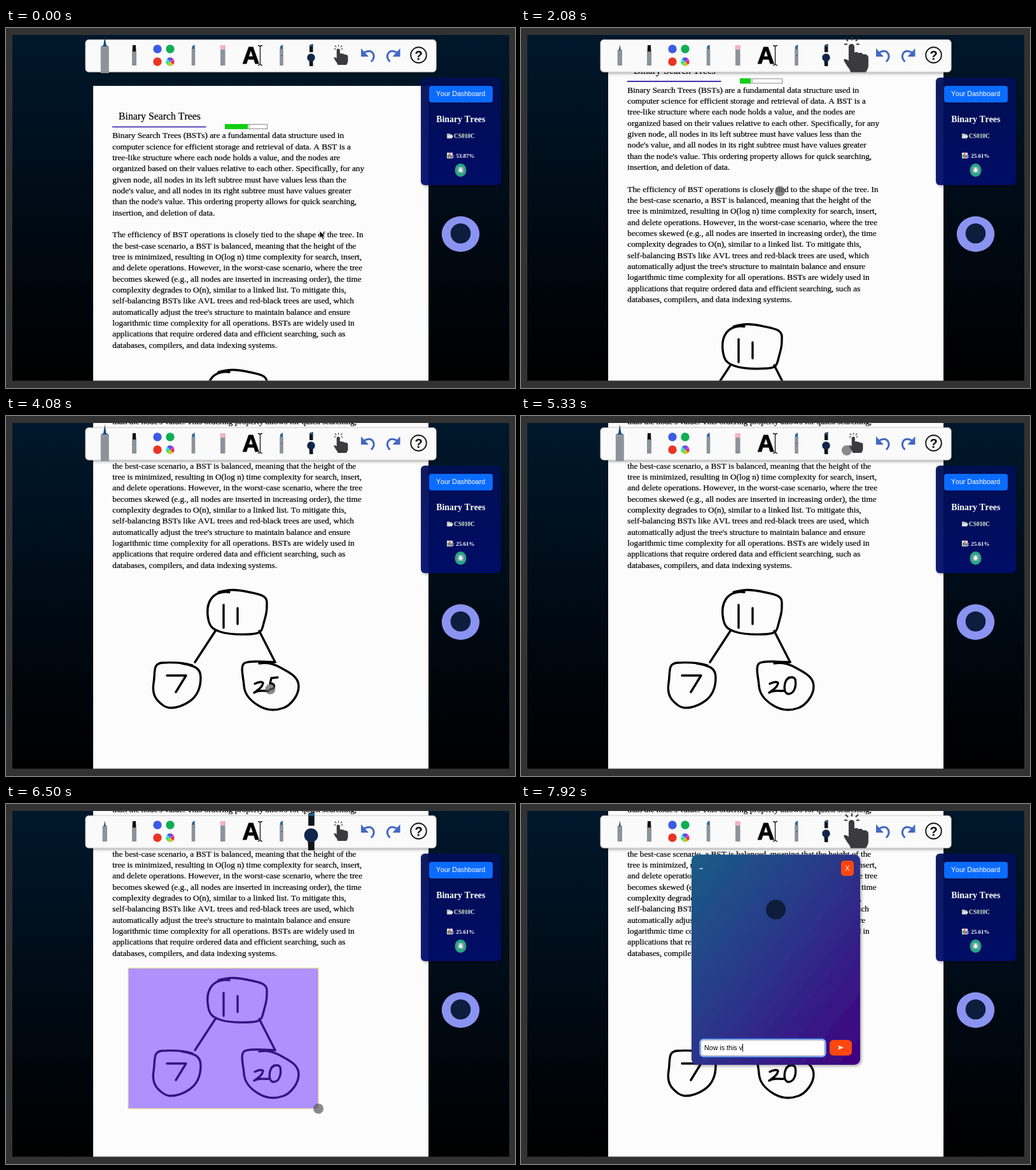
These frames come from a looping animation (800x566 px, 8000 ms). An HTML page:

```html
<!DOCTYPE html>
<html lang="en">
<head>
<meta charset="utf-8">
<title>Study board</title>
<style>
html, body { margin: 0; width: 100%; height: 100%; overflow: hidden; background: #323232; }
svg { display: block; width: 100vw; height: 100vh; }
text { font-family: "Liberation Serif", Times, serif; white-space: pre; font-kerning: none; }
.sans { font-family: "Liberation Sans", Arial, sans-serif; }
.bold { font-weight: bold; }
.ink { fill: none; stroke: #000; stroke-width: 3.4; stroke-linecap: round; stroke-linejoin: round; }
#article { font-size: 13.24px; stroke: #000; stroke-width: .22; }
</style>
</head>
<body>
<svg viewBox="0 0 800 566">
  <defs>
    <linearGradient id="night" x2="0" y2="1">
      <stop stop-color="#00182b"/><stop offset=".5" stop-color="#000b16"/><stop offset="1" stop-color="#000"/>
    </linearGradient>
    <linearGradient id="chatFill" x2="1" y2="1">
      <stop stop-color="#195d86"/><stop offset=".5" stop-color="#2c338a"/><stop offset="1" stop-color="#400080"/>
    </linearGradient>
    <linearGradient id="panelFill" x2="0" y2="1">
      <stop stop-color="#000a56"/><stop offset="1" stop-color="#000a6c"/>
    </linearGradient>
    <filter id="shadow" x="-20%" y="-20%" width="140%" height="150%">
      <feDropShadow dy="2" stdDeviation="2" flood-opacity=".35"/>
    </filter>
    <clipPath id="screen"><rect x="10" y="11" width="781" height="543.5"/></clipPath>
  </defs>

  <rect width="800" height="566" fill="#323232"/>
  <rect x="10" y="11" width="781" height="543.5" fill="url(#night)"/>

  <g clip-path="url(#screen)">
    <g id="page">
      <rect x="137" y="91" width="527" height="900" fill="#fcfcfc"/>
      <text x="177" y="143.5" font-size="15.8" stroke="#000" stroke-width=".2">Binary Search Trees</text>
      <path d="M167 155.5H314.5" stroke="#2c0fa2" stroke-width="1.7"/>
      <rect x="344.5" y="151.5" width="66" height="7" fill="#fff" stroke="#8a8a8a"/>
      <rect id="barFill" x="344" y="151" height="8" fill="#12cf12"/>
      <rect id="barEnd" y="152" width="4" height="6" fill="#d2dcd2"/>
      <g id="article"></g>
      <g class="ink" transform="translate(0 264)">
        <path d="M351 277C340 275 328 279 322 288S316 310 318 320S324 335 336 339S366 344 385 343S402 336 406 322S410 305 410 293S396 280 378 276S350 273 334 277"/>
        <path d="M342 297V333M364 302V327M329 338L297 387M398 338L423 387"/>
        <path d="M293 392C280 388 262 387 246 388S235 402 232 420S236 447 247 455S276 457 288 449S306 428 306 411S292 392 276 389"/>
        <path d="M253 408H283L267 434"/>
        <path d="M423 387C400 386 385 385 376 388S373 410 374 424S384 448 398 456S425 463 436 459S460 440 460 425S446 404 434 397S412 387 398 389"/>
        <path d="M391 421C397 418 404 417 404 420C403 426 397 430 390 435C397 430 404 433 413 432"/>
        <path id="five" pathLength="1" d="M427 411L417 412L415 421C424 418 424 433 413 429"/>
        <path id="zero" pathLength="1" d="M421 411C412 418 412 436 420 437C430 437 433 424 431 414C428 409 422 410 417 415"/>
      </g>
    </g>
    <rect id="selection" fill="#6328ff" fill-opacity=".5" stroke="#f4dc90" stroke-width="1.2"/>
  </g>

  <rect x="125" y="18.5" width="551" height="50.5" rx="5" fill="#fafafa" stroke="#d4d4d4" filter="url(#shadow)"/>
  <g id="pen">
    <path d="M-1.3 -9L0 -17L1.3 -9L3.4 -8H-3.4Z" fill="#174a7c"/>
    <path d="M-3.7 -8H3.7V16H-3.7Z" fill="#8d939b"/>
  </g>
  <g transform="translate(201.5 43)">
    <path d="M-2.5 -16H2.5L3 -5H-3Z" fill="#111"/><path d="M-3.5 -6H3.5V16H-3.5Z" fill="#8d939b"/>
  </g>
  <circle cx="238" cy="33" r="6.7" fill="#3b5be6"/>
  <circle cx="258" cy="33" r="6.7" fill="#0fae55"/>
  <circle cx="238" cy="53" r="6.7" fill="#ea3424"/>
  <g id="wheel" transform="translate(258 53)"></g>
  <g id="marker" transform="translate(294.5 43)">
    <path d="M-2.2 -10V-14L2.2 -17V-10Z" fill="#2d6596"/><path d="M-2.8 -10H2.8V16H-2.8Z" fill="#8d939b"/>
  </g>
  <use href="#marker" x="138.5"/>
  <path d="M432 43h3" stroke="#555"/>
  <path d="M337 34H344.5V59H337Z" fill="#8d939b"/>
  <path d="M336.5 27H345V34H336.5Z" fill="#f2b3c3"/>
  <text class="sans bold" x="371.5" y="55.5" font-size="37" stroke="#111" stroke-width="1.2">A</text>
  <path d="M396 27.5q3.5 0 3.5 2.5q0 -2.5 3.5 -2.5M399.5 30V56M396 58.5q3.5 0 3.5 -2.5q0 2.5 3.5 2.5" fill="none" stroke="#111" stroke-width="1.3"/>
  <g id="watch">
    <path d="M-2.5 -16L3 -18V-5H-2.5ZM-3 7H3V17H-2.5Z" fill="#10151d"/>
    <path d="M-2.5 -15L3 -17V-14H-2.5Z" fill="#2a6596"/>
    <circle cy="3.5" r="6.2" fill="#10264a"/>
  </g>
  <g id="hand"><g transform="scale(.571)" fill="#3b3b3d">
    <path d="M-11 -13a4.5 4.5 0 0 1 9 0V-4q4 -2 7 1q4 -2 7 2q6 -1 8 4V18q-1 5 -4 9H-8q-1 -5 -5 -9l-6 -10q2 -4 8 1Z"/>
    <path d="M-18 -17h5M-16 -26l4 4M-6 -28v5M4 -26l-4 4M6 -17h-5" stroke="#3b3b3d" stroke-width="2.2"/>
  </g></g>
  <g id="undo" fill="none" stroke="#4169c4" stroke-width="3">
    <path d="M562 39q13 -7 16 4q1 5 -4 10"/><path d="M558 32V45H570Z" fill="#4169c4" stroke="none"/>
  </g>
  <use href="#undo" transform="translate(1177.5 0) scale(-1 1)"/>
  <circle cx="648.5" cy="42.5" r="12.3" fill="none" stroke="#111" stroke-width="1.9"/>
  <text class="sans bold" x="648.5" y="49.5" font-size="20" text-anchor="middle">?</text>

  <rect x="652" y="78" width="126" height="169" rx="6" fill="url(#panelFill)" fill-opacity=".92" filter="url(#shadow)"/>
  <rect x="665" y="91" width="100" height="26" rx="4" fill="#0a6cff"/>
  <g fill="#fff">
    <text class="sans" x="676" y="107.3" font-size="10.6">Your Dashboard</text>
    <text class="bold" x="676.3" y="147.5" font-size="13.8">Binary Trees</text>
    <text class="bold" x="704" y="172.5" font-size="9.4" fill="#d9f2d0">CS010C</text>
    <text class="bold" id="score" x="702" y="203.5" font-size="9"></text>
    <path d="M693 166h4l1 1h3v6h-8Z" fill="#b9c3bd"/><path d="M694.5 169H703L701 173.5H693Z" fill="#dfe5e0"/>
    <path d="M693 196h9v9h-9Z" fill="#e4e8ec"/>
    <path d="M694 199h2v5h-2Z" fill="#2fa84f"/><path d="M696.5 197h2v7h-2Z" fill="#d83a3a"/><path d="M699 200h2v4h-2Z" fill="#2b6fc4"/>
    <ellipse cx="714.5" cy="223.5" rx="9" ry="10.5" fill="#2aa583"/>
    <rect x="710" y="218.5" width="9" height="9.5" rx="1.5" fill="#8fa9b8"/>
    <path d="M713 219.5h3v3.5h2.5l-4 4l-4 -4h2.5Z"/>
  </g>
  <ellipse cx="714.5" cy="324" rx="29.7" ry="28" fill="#8b93f1"/>
  <circle cx="714.5" cy="323" r="15.8" fill="#0c1d3d"/>

  <g id="chat">
    <rect x="268" y="79.5" width="265" height="330.5" rx="9" fill="url(#chatFill)" filter="url(#shadow)"/>
    <path d="M280.5 101.5h5.5" stroke="#fff" stroke-width="1.2"/>
    <rect x="503" y="89" width="20" height="24" rx="5" fill="#ff470f"/>
    <text class="sans" x="513" y="104.5" font-size="10.6" fill="#fff" text-anchor="middle">X</text>
    <circle cx="400.5" cy="166" r="15.5" fill="#0d1d3b"/>
    <rect id="ring" x="280.5" y="369" width="199" height="29" rx="6.5" fill="#fff" stroke="#1c63d6" stroke-width="1.5"/>
    <rect x="282.5" y="371" width="195" height="25" rx="5" fill="#fff" stroke="#4b4f8f" stroke-width=".8"/>
    <text class="sans" id="typed" x="288" y="387.3" font-size="10.7"></text>
    <rect id="caret" y="377" width="1" height="12.5"/>
    <rect x="485" y="371" width="35" height="24.5" rx="6" fill="#ff470f"/>
    <path d="M498 379.5L507 383L498 386.5L500 383Z" fill="#fff"/>
  </g>

  <circle id="dot" r="8" fill="#5a5a5a" fill-opacity=".7"/>
  <path id="arrow" d="M0 0V11.5L2.7 9L4.7 13.5L6.8 12.5L4.9 8.3H8.5Z" stroke="#fff" stroke-width=".9"/>
</svg>
<script>
const LOOP = 8000;
const ARTICLE = `Binary Search Trees (BSTs) are a fundamental data structure used in
computer science for efficient storage and retrieval of data. A BST is a
tree-like structure where each node holds a value, and the nodes are
organized based on their values relative to each other. Specifically, for any
given node, all nodes in its left subtree must have values less than the
node's value, and all nodes in its right subtree must have values greater
than the node's value. This ordering property allows for quick searching,
insertion, and deletion of data.

The efficiency of BST operations is closely tied to the shape of the tree. In
the best-case scenario, a BST is balanced, meaning that the height of the
tree is minimized, resulting in O(log n) time complexity for search, insert,
and delete operations. However, in the worst-case scenario, where the tree
becomes skewed (e.g., all nodes are inserted in increasing order), the time
complexity degrades to O(n), similar to a linked list. To mitigate this,
self-balancing BSTs like AVL trees and red-black trees are used, which
automatically adjust the tree's structure to maintain balance and ensure
logarithmic time complexity for all operations. BSTs are widely used in
applications that require ordered data and efficient searching, such as
databases, compilers, and data indexing systems.`;
const QUESTION = 'Now is this v';

const $ = id => document.getElementById(id);
const set = (el, attrs) => { for (const k in attrs) el.setAttribute(k, attrs[k]); };
const show = (el, on) => { el.style.display = on ? '' : 'none'; };
const clamp = v => Math.min(1, Math.max(0, v));
const ramp = (t, from, to) => clamp((t - from) / (to - from));
const smooth = p => p * p * (3 - 2 * p);

// Keys are [time, ...values]; values are interpolated between neighbours.
function track(keys, t, ease = p => p) {
  const next = keys.findIndex(k => k[0] > t);
  if (next < 0) return keys.at(-1).slice(1);
  if (next === 0) return keys[0].slice(1);
  const a = keys[next - 1], b = keys[next];
  const p = ease(ramp(t, a[0], b[0]));
  return a.slice(1).map((v, i) => v + (b[i + 1] - v) * p);
}

const SCROLL = [[1950, 0], [2080, 71], [2300, 222], [2420, 264]];
const POINTER = [
  [0, 493, 319], [200, 500, 300], [560, 526, 43], [680, 526, 43],
  [1120, 380, 155], [1420, 361, 155], [1720, 407, 256.5], [2480, 407, 256.5],
  [2760, 155, 43], [2850, 155, 43], [3080, 427, 411], [3330, 413, 429],
  [3540, 569, 42], [3620, 569, 42], [3780, 427, 411], [4100, 413, 429],
  [4200, 413, 429], [4440, 569, 42], [4520, 569, 42], [4740, 421, 411],
  [4980, 417, 415], [5080, 440, 320], [5330, 512, 54], [5440, 480, 43],
  [5560, 480, 43], [5830, 240, 240], [5960, 192, 258], [6450, 491, 479],
  [6680, 491, 479], [6950, 380, 383]
];
const TOOLS = [
  { el: $('pen'), x: 155.3, y: 43, active: [[-500, 600], [2800, 5480]] },
  { el: $('hand'), x: 526, y: 42.5, active: [[600, 2800], [6590, 9000]] },
  { el: $('watch'), x: 479.5, y: 43, active: [[5480, 6590]] }
];
// Each span is [start, end, undone]: the stroke is drawn, then stays until undone.
const STROKES = [
  { el: $('five'), spans: [[3080, 3330, 3600], [3780, 4100, 4500]] },
  { el: $('zero'), spans: [[4740, 4980, LOOP]] }
];

$('article').innerHTML = ARTICLE.split('\n')
  .map((line, i) => `<text x="167.3" y="${173.3 + i * 17.34}">${line}</text>`).join('');
$('wheel').innerHTML = Array.from({ length: 8 }, (_, i) =>
  `<path d="M0 0L6.7 0A6.7 6.7 0 0 1 4.74 4.74Z" transform="rotate(${i * 45})" fill="hsl(${i * 45} 75% 55%)"/>`).join('');

function render(t) {
  const [scroll] = track(SCROLL, t);
  set($('page'), { transform: `translate(0 ${-scroll})` });

  const [score] = track([[1120, 53.87], [1420, 25.61]], t);
  const filled = score / 100 * 67;
  $('score').textContent = `: ${score.toFixed(2)}%`;
  set($('barFill'), { width: filled });
  set($('barEnd'), { x: 344 + filled });

  for (const { el, x, y, active } of TOOLS) {
    const grow = Math.max(...active.map(([on, off]) => ramp(t, on, on + 130) - ramp(t, off, off + 130)));
    set(el, { transform: `translate(${x} ${y}) scale(${1 + .75 * smooth(grow)})` });
  }

  let [x, y] = track(POINTER, t, smooth);
  for (const { el, spans } of STROKES) {
    const span = spans.find(([start, , undone]) => t > start && t < undone);
    show(el, span);
    if (!span) continue;
    const p = ramp(t, span[0], span[1]);
    set(el, { 'stroke-dasharray': `${p} 2` });
    if (p < 1) ({ x, y } = el.getPointAtLength(p * el.getTotalLength()));
  }

  show($('selection'), t > 5960 && t < 6680);
  set($('selection'), { x: 192, y: 258, width: Math.max(0, x - 192), height: Math.max(0, y - 258) });

  $('chat').style.opacity = ramp(t, 6660, 6800);
  show($('ring'), t > 7000);
  show($('caret'), t > 7000);
  $('typed').textContent = QUESTION.slice(0, Math.max(0, Math.floor((t - 7080) / 70) + 1));
  set($('caret'), { x: 288 + $('typed').getComputedTextLength() });

  show($('arrow'), t < 600);
  show($('dot'), t >= 600 && t < 7080);
  for (const id of ['arrow', 'dot']) set($(id), { transform: `translate(${x} ${y})` });
}

function frame(now) {
  render(now % LOOP);
  requestAnimationFrame(frame);
}
requestAnimationFrame(frame);
</script>
</body>
</html>
```
